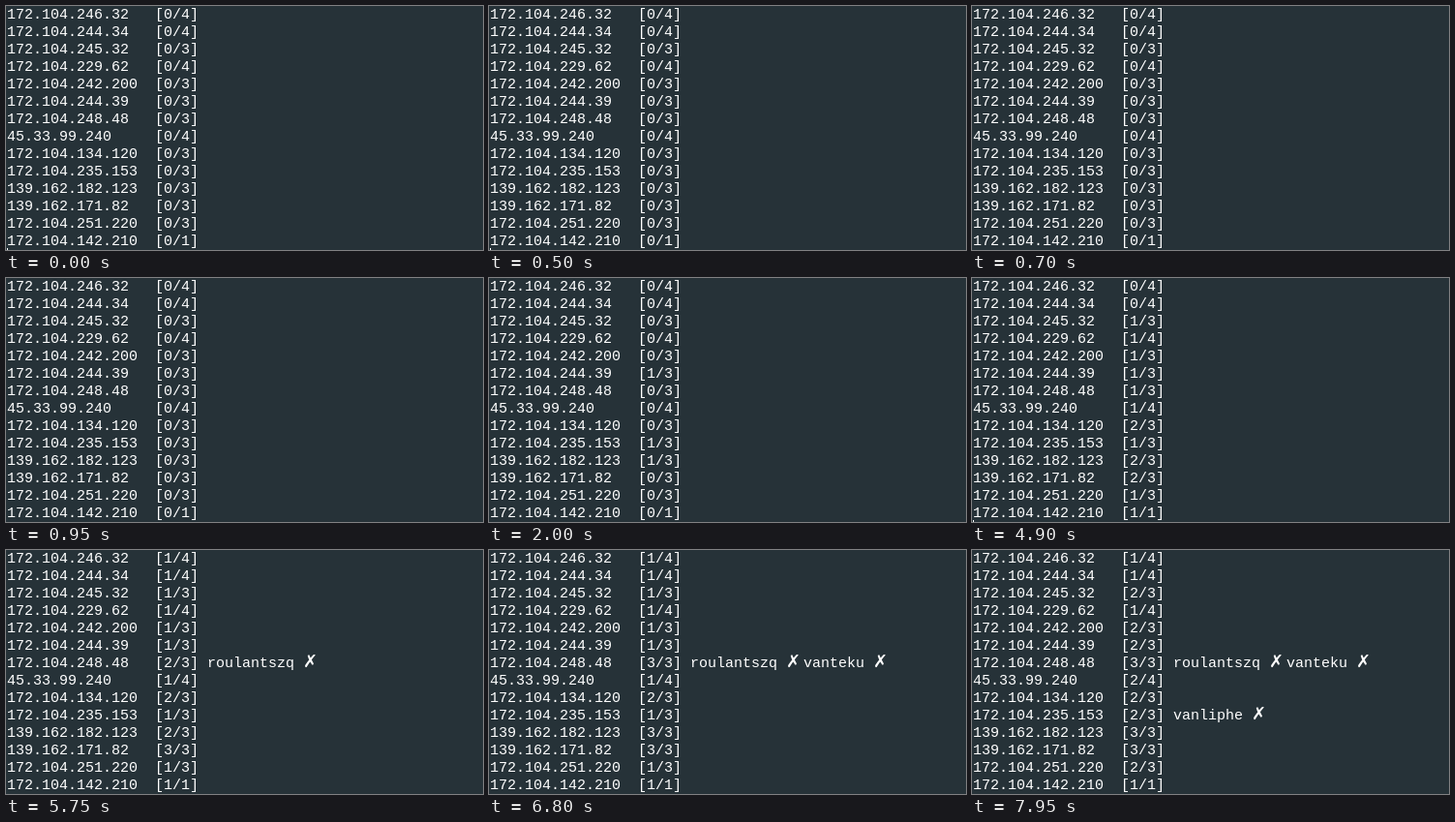
These frames come from a looping animation (493 px wide and 252 px high, 8 s). An HTML page:

```html
<!DOCTYPE html>
<html lang="en">
<head>
<meta charset="utf-8">
<title>Scan progress</title>
<style>
  html, body { margin: 0; width: 100%; height: 100%; overflow: hidden; background: #263238; }
  svg { display: block; width: 493px; height: 252px; }
  text { font: 15px "Liberation Mono", monospace; fill: #fff; white-space: pre; }
  .cross { font: 18px "DejaVu Sans", sans-serif; }
</style>
</head>
<body>
<svg id="screen" viewBox="0 0 493 252"><rect id="cursor" x="1" y="250" width="1" height="2" fill="#fff"/></svg>
<script>
const LOOP = 8000, CELL = 9, LINE = 18, BASELINE = 13;
const screen = document.getElementById('screen');
const cursor = document.getElementById('cursor');

// address, total, times at which the counter goes up
const hosts = [
  ['172.104.246.32', 4, [4950]],
  ['172.104.244.34', 4, [5500]],
  ['172.104.245.32', 3, [3900, 7800]],
  ['172.104.229.62', 4, [4100]],
  ['172.104.242.200', 3, [2950, 7000]],
  ['172.104.244.39', 3, [1500, 7150]],
  ['172.104.248.48', 3, [3000, 5150, 5900]],
  ['45.33.99.240', 4, [3000, 7300]],
  ['172.104.134.120', 3, [3050, 4050]],
  ['172.104.235.153', 3, [1900, 7450]],
  ['139.162.182.123', 3, [1950, 3000, 6450]],
  ['139.162.171.82', 3, [3100, 4000, 5550]],
  ['172.104.251.220', 3, [3050, 7600]],
  ['172.104.142.210', 1, [3100]],
];

// row, column, name, time of appearance
const failures = [
  [6, 23, 'roulantszq', 5150],
  [6, 36, 'vanteku', 5900],
  [9, 23, 'vanliphe', 7450],
];

function addText(row, column, content, className = '') {
  const node = document.createElementNS('http://www.w3.org/2000/svg', 'text');
  node.setAttribute('x', 1 + column * CELL);
  node.setAttribute('y', BASELINE + row * LINE);
  node.setAttribute('class', className);
  node.textContent = content;
  screen.append(node);
  return node;
}

const counters = hosts.map(([address, total, times], row) => {
  addText(row, 0, address);
  return { node: addText(row, 17, ''), total, times };
});

const labels = failures.map(([row, column, name, start]) => ({
  start,
  nodes: [addText(row, column, name), addText(row, column + name.length + 1, '✗', 'cross')],
}));

const show = (node, visible) => node.setAttribute('visibility', visible ? 'visible' : 'hidden');

function draw(now) {
  const t = now % LOOP;
  for (const { node, total, times } of counters) {
    const content = `[${times.filter(time => time <= t).length}/${total}]`;
    if (node.textContent !== content) node.textContent = content;
  }
  for (const { start, nodes } of labels) nodes.forEach(node => show(node, t >= start));
  show(cursor, t < 700 || Math.floor((t + 500) / 600) % 2 === 1);
}

const begin = performance.now();
function tick() {
  draw(performance.now() - begin);
  requestAnimationFrame(tick);
}
tick();
</script>
</body>
</html>
```
